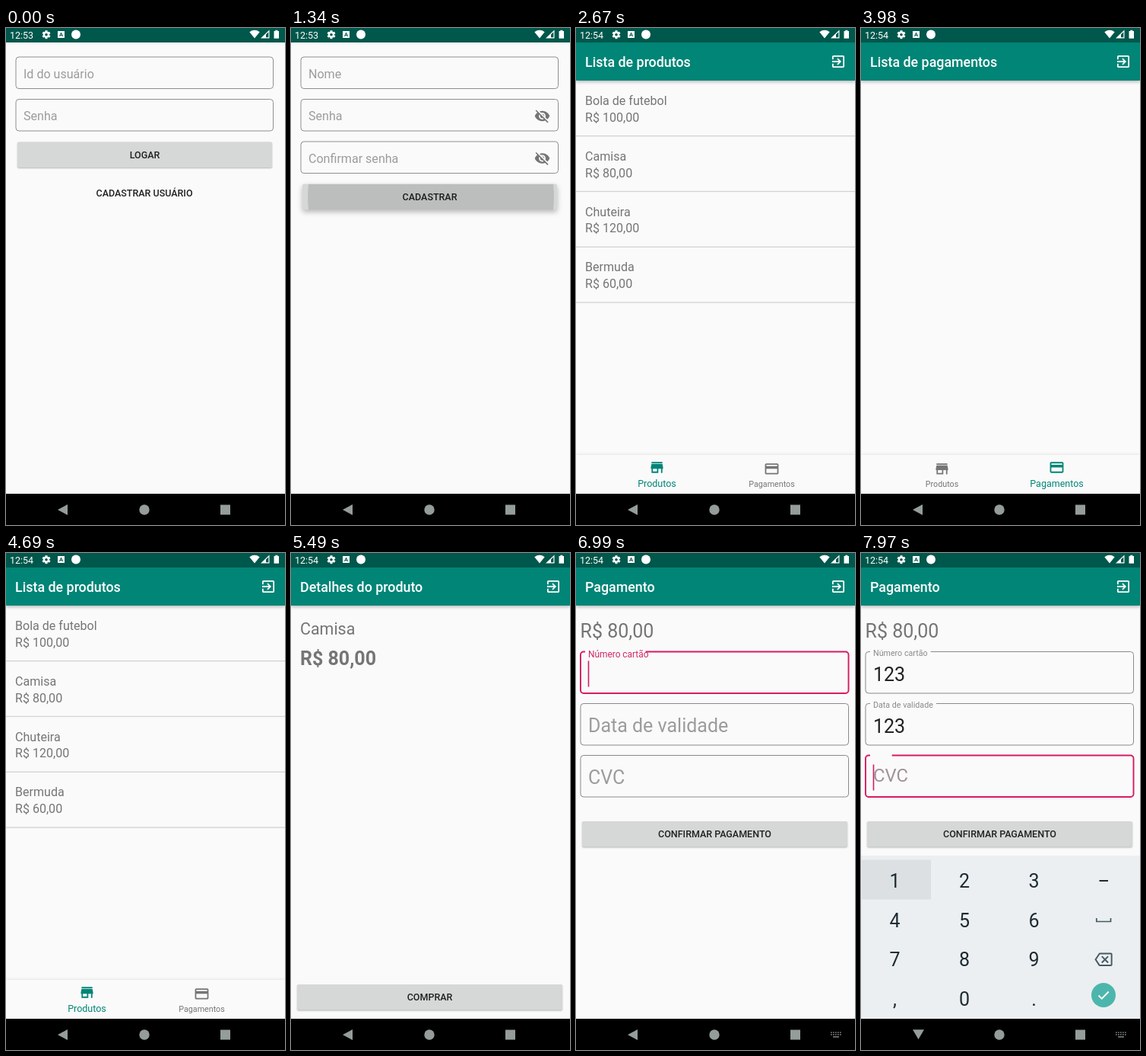
An HTML page with a canvas that plays this animation: 367x652 px, repeating every 7990 ms.

```html
<!DOCTYPE html>
<html lang="pt">
<head>
<meta charset="utf-8">
<style>
  html, body { margin: 0; width: 100%; height: 100%; overflow: hidden; background: #fafafa; }
  canvas { display: block; width: 100vw; height: 100vh; }
</style>
</head>
<body>
<canvas id="stage"></canvas>
<script>
const W = 367, H = 652, LOOP = 7990, FADE = 220;
const BG = '#fafafa', TEAL = '#008577', DARK = '#00574b', GREY = '#757575', HINT = '#9c9c9c', PINK = '#d81b60';
const canvas = document.getElementById('stage');
const ctx = canvas.getContext('2d');
const dpr = window.devicePixelRatio || 1;
canvas.width = Math.round(W * dpr);
canvas.height = Math.round(H * dpr);

const sp = n => n * W / 411;
const clamp = v => Math.max(0, Math.min(1, v));
const span = (t, start, length) => clamp((t - start) / length);
const mix = (a, b, k) => a + (b - a) * k;

// cubic-bezier(.4, 0, .2, 1)
function ease(x) {
  let lo = 0, hi = 1;
  for (let i = 0; i < 20; i++) {
    const s = (lo + hi) / 2;
    const bx = 1.2 * s * (1 - s) ** 2 + 0.6 * s * s * (1 - s) + s ** 3;
    if (bx < x) lo = s; else hi = s;
  }
  return lo * lo * (3 - 2 * lo);
}

function mixColor(a, b, k) {
  const part = (c, i) => parseInt(c.substr(1 + i * 2, 2), 16);
  return `rgb(${[0, 1, 2].map(i => Math.round(mix(part(a, i), part(b, i), k))).join()})`;
}

// ---------- drawing helpers ----------
function text(s, x, y, size, color, weight = 400, align = 'left') {
  ctx.font = `${weight} ${size}px Roboto, sans-serif`;
  ctx.textAlign = align;
  ctx.fillStyle = color;
  ctx.fillText(s, x, y);
}

function rect(x, y, w, h, color) {
  ctx.fillStyle = color;
  ctx.fillRect(x, y, w, h);
}

function disc(x, y, r, color) {
  ctx.fillStyle = color;
  ctx.beginPath();
  ctx.arc(x, y, r, 0, Math.PI * 2);
  ctx.fill();
}

function poly(color, ...points) {
  ctx.fillStyle = color;
  ctx.beginPath();
  points.forEach(([x, y]) => ctx.lineTo(x, y));
  ctx.closePath();
  ctx.fill();
}

function line(color, width, ...points) {
  ctx.strokeStyle = color;
  ctx.lineWidth = width;
  ctx.beginPath();
  points.forEach(([x, y]) => ctx.lineTo(x, y));
  ctx.stroke();
}

function roundPath(x, y, w, h, r) {
  ctx.beginPath();
  ctx.moveTo(x + r, y);
  ctx.arcTo(x + w, y, x + w, y + h, r);
  ctx.arcTo(x + w, y + h, x, y + h, r);
  ctx.arcTo(x, y + h, x, y, r);
  ctx.arcTo(x, y, x + w, y, r);
  ctx.closePath();
}

function outline(x, y, w, h, color, width) {
  roundPath(x, y, w, h, 4);
  ctx.strokeStyle = color;
  ctx.lineWidth = width;
  ctx.stroke();
}

function shadow(alpha, blur, dy) {
  ctx.shadowColor = `rgba(0,0,0,${alpha})`;
  ctx.shadowBlur = blur * dpr;
  ctx.shadowOffsetY = dy * dpr;
}

function button(label, x, y, w, h, press = 0) {
  ctx.save();
  shadow(0.28, mix(2, 7, press), mix(1, 3, press));
  roundPath(x, y, w, h, 2);
  ctx.fillStyle = '#d6d7d7';
  ctx.fill();
  ctx.restore();
  text(label, x + w / 2, y + h / 2 + 4.4, sp(14), '#212121', 500, 'center');
}

const icons = {
  exit: 'M10.09 15.59L11.5 17l5-5-5-5-1.41 1.41L12.67 11H3v2h9.67l-2.58 2.59zM19 3H5c-1.11 0-2 .9-2 2v4h2V5h14v14H5v-4H3v4c0 1.1.89 2 2 2h14c1.1 0 2-.9 2-2V5c0-1.1-.9-2-2-2z',
  shop: 'M20 4H4v2h16V4zm1 10v-2l-1-5H4l-1 5v2h1v6h10v-6h4v6h2v-6h1zm-9 4H6v-4h6v4z',
  card: 'M20 4H4c-1.11 0-2 .89-2 2v12c0 1.11.89 2 2 2h16c1.11 0 2-.89 2-2V6c0-1.11-.89-2-2-2zm0 14H4v-6h16v6zm0-10H4V6h16v2z',
  erase: 'M22 3H7c-.69 0-1.23.35-1.59.88L0 12l5.41 8.11c.36.53.9.89 1.59.89h15c1.1 0 2-.9 2-2V5c0-1.1-.9-2-2-2zm0 16H7.07L2.4 12l4.66-7H22v14zm-11.59-2L14 13.41 17.59 17 19 15.59 15.41 12 19 8.41 17.59 7 14 10.59 10.41 7 9 8.41 12.59 12 9 15.59z',
  eyeOff: 'M12 7c2.76 0 5 2.24 5 5 0 .65-.13 1.26-.36 1.83l2.92 2.92c1.51-1.26 2.7-2.89 3.43-4.75-1.73-4.39-6-7.5-11-7.5-1.4 0-2.74.25-3.98.7l2.16 2.16C10.74 7.13 11.35 7 12 7zM2 4.27l2.74 2.74C3.08 8.3 1.78 10.02 1 12c1.73 4.39 6 7.5 11 7.5 1.55 0 3.03-.3 4.38-.84L19.73 22 21 20.73 3.27 3 2 4.27zM7.53 9.8l1.55 1.55c-.05.21-.08.43-.08.65 0 1.66 1.34 3 3 3 .22 0 .44-.03.65-.08l1.55 1.55c-.67.33-1.41.53-2.2.53-2.76 0-5-2.24-5-5 0-.79.2-1.53.53-2.2zm4.31-.78l3.15 3.15.02-.16c0-1.66-1.34-3-3-3l-.17.01z'
};
for (const name in icons) icons[name] = new Path2D(icons[name]);

function icon(name, cx, cy, size, color) {
  ctx.save();
  ctx.translate(cx - size / 2, cy - size / 2);
  ctx.scale(size / 24, size / 24);
  ctx.fillStyle = color;
  ctx.fill(icons[name]);
  ctx.restore();
}

// ---------- screens ----------
function loginField(row, label, secret) {
  const y = 38 + row * 55.5;
  outline(13, y, 338.5, 41.5, '#8f8f8f', 1);
  text(label, 23, y + 27.5, sp(18), HINT);
  if (secret) icon('eyeOff', 330.5, y + 22, sp(24), GREY);
}

const PRODUCTS = [['Bola de futebol', '100'], ['Camisa', '80'], ['Chuteira', '120'], ['Bermuda', '60']];
const typed = (t, ...times) => '123'.slice(0, times.filter(at => t >= at).length);

function payField(y, label, value, lift, focused) {
  outline(6, y, 352.5, 54.5, focused ? PINK : '#8a8a8a', focused ? 1.9 : 1);
  if (lift > 0) {
    ctx.font = `400 ${sp(12)}px Roboto, sans-serif`;
    rect(12, y - 2, ctx.measureText(label).width + 8, 4, BG);
  }
  if (!value || lift > 0) {
    const color = mixColor(HINT, focused ? PINK : '#8a8a8a', lift);
    text(label, 16, mix(y + 37, y + 5.2, lift), mix(sp(28), sp(12), lift), color);
  }
  text(value, 16, y + 38.5, sp(28), '#212121');
  if (focused) rect(15.7, y + 12, 1.6, 34, PINK);
}

const screens = {
  login() {
    loginField(0, 'Id do usuário');
    loginField(1, 'Senha');
    button('LOGAR', 15, 149.5, 335, 33.5);
    text('CADASTRAR USUÁRIO', 182, 220.7, sp(14), '#212121', 500, 'center');
  },
  signup(t) {
    loginField(0, 'Nome');
    loginField(1, 'Senha', true);
    loginField(2, 'Confirmar senha', true);
    button('CADASTRAR', 15, 204.7, 335, 33.5, span(t, 1270, 70));
  },
  list() {
    PRODUCTS.forEach(([name, price], i) => {
      const y = i * 72.8;
      text(name, 12, y + 101, sp(18), GREY);
      text(`R$ ${price},00`, 12, y + 122.7, sp(18), GREY);
      rect(0, y + 141, W, 1.3, '#d3d3d3');
    });
  },
  bills() {},
  details() {
    text('Camisa', 12, 107, sp(24), GREY);
    text('R$ 80,00', 12, 147, sp(28), GREY, 700);
    button('COMPRAR', 8, 566, 349, 33.5, span(t0, 6200, 70));
  },
  pay(t) {
    text('R$ 80,00', 5.5, 111, sp(28), GREY);
    const lift = start => ease(span(t, start, 160));
    payField(129.5, 'Número cartão', typed(t, 7440, 7490, 7540), lift(6885), t >= 6800 && t < 7590);
    payField(197.5, 'Data de validade', typed(t, 7900, 7925, 7945), lift(7590), t >= 7590 && t < 7950);
    payField(265.5, 'CVC', '', lift(7945), t >= 7950);
    button('CONFIRMAR PAGAMENTO', 8, 352, 349, 33.5);
  }
};
const titles = {
  list: 'Lista de produtos', bills: 'Lista de pagamentos',
  details: 'Detalhes do produto', pay: 'Pagamento'
};
const route = [
  [-FADE, 'login'], [748, 'signup'], [1395, 'login'], [2445, 'list'],
  [3755, 'bills'], [4465, 'list'], [5265, 'details'], [6355, 'pay']
];

// start, fade start, touch x, y, clip box, radius limit, colour
const ripples = [
  [730, 800, 182, 216, [15, 200, 335, 33], 340, '0,0,0'],
  [1270, 1440, 184, 221.5, [15, 204.7, 335, 33.5], 340, '0,0,0'],
  [2140, 2330, 184, 166, [15, 149.5, 335, 33.5], 340, '0,0,0'],
  [3710, 3820, 257, 585, [0, 560, W, 51], 76, '0,133,119'],
  [4410, 4530, 106, 585, [0, 560, W, 51], 76, '0,133,119'],
  [5230, 5330, 150, 178, [0, 142, W, 72], 380, '0,0,0'],
  [6200, 6390, 184, 583, [8, 566, 349, 33.5], 360, '0,0,0']
];

function drawRipples(t) {
  for (const [start, fade, x, y, box, limit, rgb] of ripples) {
    const alpha = 0.12 * (1 - span(t, fade, 150));
    if (t < start || alpha <= 0) continue;
    ctx.save();
    ctx.beginPath();
    ctx.rect(...box);
    ctx.clip();
    disc(x, y, Math.min(limit, limit / 7 + (t - start) * limit / 213), `rgba(${rgb},${alpha})`);
    ctx.restore();
  }
}

// ---------- system and app chrome ----------
function statusBar(t) {
  rect(0, 0, W, 19, DARK);
  text(t < 2445 ? '12:53' : '12:54', 5, 13.5, sp(14), '#fff');
  ctx.save();
  ctx.translate(53, 8.7);
  for (let i = 0; i < 3; i++) {
    rect(-1.5, -5.5, 3, 11, '#fff');
    ctx.rotate(Math.PI / 3);
  }
  disc(0, 0, 4.1, '#fff');
  disc(0, 0, 1.8, DARK);
  ctx.restore();
  rect(68, 4, 9, 9, '#fff');
  text('A', 72.5, 11.3, 7.5, DARK, 700, 'center');
  disc(92, 8.6, 6, '#fff');

  ctx.fillStyle = '#fff';
  ctx.beginPath();
  ctx.moveTo(327, 13.5);
  ctx.lineTo(320.3, 5.3);
  ctx.quadraticCurveTo(327, 0.4, 333.7, 5.3);
  ctx.fill();
  poly('#fff', [335, 13.5], [346.5, 13.5], [346.5, 2.5]);
  poly(DARK, [342, 12.3], [342, 8.4], [345.3, 5.3], [345.3, 12.3]);
  rect(352.5, 4, 6.5, 9.7, '#fff');
  rect(354.3, 2.8, 3, 1.3, '#fff');
}

function appBar(title) {
  ctx.save();
  shadow(0.25, 4, 1.5);
  rect(0, 19, W, 50, TEAL);
  ctx.restore();
  text(title, 12, 51, sp(20), '#fff', 500);
  icon('exit', 345, 44, sp(24), '#fff');
}

function tab(name, label, x, k) {
  const color = mixColor(GREY, TEAL, k);
  icon(name, x, mix(578.3, 576.5, k), sp(24), color);
  text(label, x, mix(602, 601.7, k), mix(sp(12), sp(14), k), color, 400, 'center');
}

function tabBar(t) {
  ctx.save();
  shadow(0.14, 4, -0.5);
  rect(0, 560, W, 51, BG);
  ctx.restore();
  const k = ease(span(t, 3755, 120)) - ease(span(t, 4465, 120));
  tab('shop', 'Produtos', 106.5, 1 - k);
  tab('card', 'Pagamentos', 257.5, k);
}

function keyboard(t) {
  const k = ease(span(t, 7000, 205));
  if (k <= 0) return;
  const ink = '#1d2b31', cols = [44.5, 136, 227.5, 319], rowY = i => 429.5 + i * 51.8;
  ctx.save();
  ctx.globalAlpha = k;
  ctx.translate(0, 22 * (1 - k));
  rect(0, 397, W, 255, '#eceff1');
  [7440, 7490, 7540].forEach((at, i) => {
    const down = t >= at && t < at + 50;
    if (down || (i === 0 && t >= 7900)) rect(1 + i * 91.5, 402.5, 91, 52, '#dce0e2');
  });
  ['123', '456', '789', ',0.'].forEach((keys, r) => {
    [...keys].forEach((c, i) => text(c, cols[i], rowY(r) + 9.3, sp(28), ink, 400, 'center'));
  });
  rect(313.5, 429, 11.5, 2, ink);
  line('#455a64', 1.7, [309.8, 479], [309.8, 483.5], [328.5, 483.5], [328.5, 479]);
  icon('erase', 319, 533.3, sp(26), '#455a64');
  disc(319, 580, 16, t >= 7590 && t < 7650 ? '#3da096' : '#4db6ac');
  line('#fff', 1.8, [312.5, 580.5], [316.7, 584.7], [325.7, 575.5]);
  ctx.restore();
}

function navBar(t) {
  const grey = '#949d9a';
  rect(0, 611, W, 41, '#000');
  if (t < 7100) poly(grey, [68, 632], [81, 625], [81, 639]);
  else poly(grey, [68, 625.3], [83, 625.3], [75.5, 638]);
  disc(182, 632, 6.7, grey);
  rect(282, 625.5, 13, 13, grey);
  if (t < 6900) return;
  for (let r = 0; r < 2; r++) {
    for (let i = 0; i < 5; i++) rect(335 + i * 3, 628.3 + r * 2.8, 1.7, 1.5, '#7d8583');
  }
  rect(338, 634, 8, 1.5, '#7d8583');
}

// ---------- frame ----------
let t0 = 0;

function draw(t) {
  t0 = t;
  ctx.setTransform(canvas.width / W, 0, 0, canvas.height / H, 0, 0);
  ctx.globalAlpha = 1;
  rect(0, 0, W, H, BG);

  const at = route.filter(([start]) => t >= start).length - 1;
  const [start, name] = route[at];
  const k = span(t, start, FADE);
  if (k < 1 && at > 0) {
    ctx.globalAlpha = 1 - k;
    screens[route[at - 1][1]](t);
  }
  ctx.globalAlpha = k;
  screens[name](t);
  ctx.globalAlpha = 1;

  if (titles[name]) appBar(titles[name]);
  if (name === 'list' || name === 'bills') tabBar(t);
  drawRipples(t);
  keyboard(t);
  statusBar(t);
  navBar(t);
}

const begin = performance.now();
function tick() {
  draw((performance.now() - begin) % LOOP);
  requestAnimationFrame(tick);
}
tick();
</script>
</body>
</html>
```
